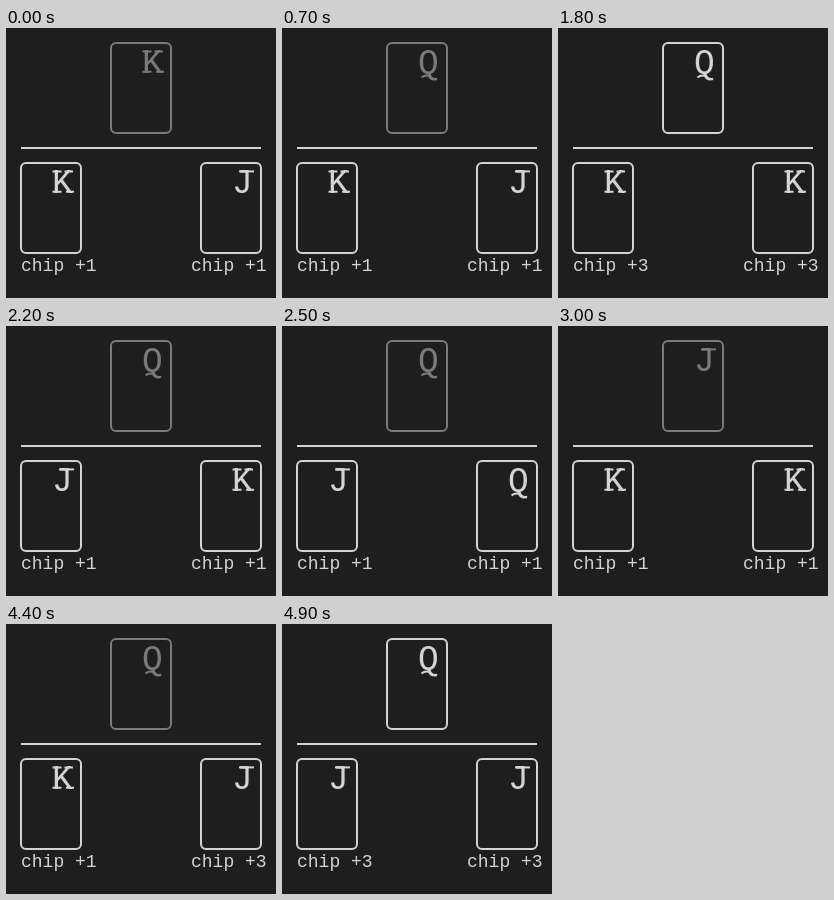
An HTML page that plays this animation: 270 px wide and 270 px high, repeating every 5 s.

```html
<!DOCTYPE html>
<html lang="en">
<head>
<meta charset="utf-8">
<title>Card game</title>
<style>
  html, body { margin: 0; width: 100%; height: 100%; overflow: hidden; background: #1e1e1e; }
  svg { display: block; width: 100%; height: 100%; }
  text { font: 18px "Liberation Mono", monospace; fill: currentColor; stroke: none; white-space: pre; }
  .rank { font-size: 34.5px; }
  rect, path { fill: none; stroke: currentColor; stroke-width: 2; }
</style>
</head>
<body>
<svg id="table" viewBox="0 0 270 270"></svg>
<script>
const STEP = 100;
const LIGHT = '#d3d3d3', DIM = '#7a7a7a';

// Each hand: public, left and right card, who starts, then the moves
// (c = check or call, r = raise, f = fold). The last move leads to the next deal.
const HANDS = [
  'KKJ R crrcrrc', 'QKJ L rcrf', 'KKJ R crcrf', 'QKK R rccrrc', 'QJK L rrf',
  'QJQ R crcrf', 'JKK R crrcrrf', 'KQJ L crcrf', 'QKJ L crcrf', 'QJJ L rcf'
];

// Slab serifs and tail added to each rank letter
const SERIFS = {
  K: 'M1.5-21.6h9M13.5-21.6h8.5M1.5-1.2h9M15-1.2h8',
  J: 'M8-21.6h15',
  Q: 'M4.5 4.5Q8 1.5 12 3'
};

function playHand(hand) {
  const [cards, starter, moves] = hand.split(' ');
  const first = starter === 'L' ? 0 : 1;
  const chips = [1, 1];
  const states = [];
  let turn = first, open = false, acted = false;
  const save = () => states.push({ cards, open, chips: [...chips] });

  save();
  for (const move of moves.slice(0, -1)) {
    const other = 1 - turn;
    if (move === 'r') {
      chips[turn] = chips[other] + (open ? 4 : 2);
    } else {
      chips[turn] = chips[other];
    }
    if (move === 'c' && acted) {
      open = true;
      acted = false;
      turn = first;
    } else {
      acted = true;
      turn = other;
    }
    save();
  }
  return states;
}

function card(x, y, rank, color) {
  return `<g color="${color}" transform="translate(${x} ${y})">
    <rect width="60" height="90" rx="5"/>
    <g transform="translate(30 30)">
      <text class="rank" x="1">${rank}</text><path d="${SERIFS[rank]}"/>
    </g></g>`;
}

function label(x, chips) {
  return `<text x="${x}" y="243" color="${LIGHT}">chip +${chips}</text>`;
}

function draw({ cards, open, chips: [left, right] }) {
  table.innerHTML =
    card(105, 15, cards[0], open ? LIGHT : DIM) +
    `<path d="M15 120H255" color="${LIGHT}"/>` +
    card(15, 135, cards[1], LIGHT) +
    card(195, 135, cards[2], LIGHT) +
    label(15, left) +
    label(right > 9 ? 175 : 185, right);
}

const table = document.getElementById('table');
const states = HANDS.flatMap(playHand);
const start = performance.now();
let shown = -1;

function tick() {
  const step = Math.floor((performance.now() - start) / STEP) % states.length;
  if (step !== shown) draw(states[shown = step]);
  requestAnimationFrame(tick);
}
tick();
</script>
</body>
</html>
```
